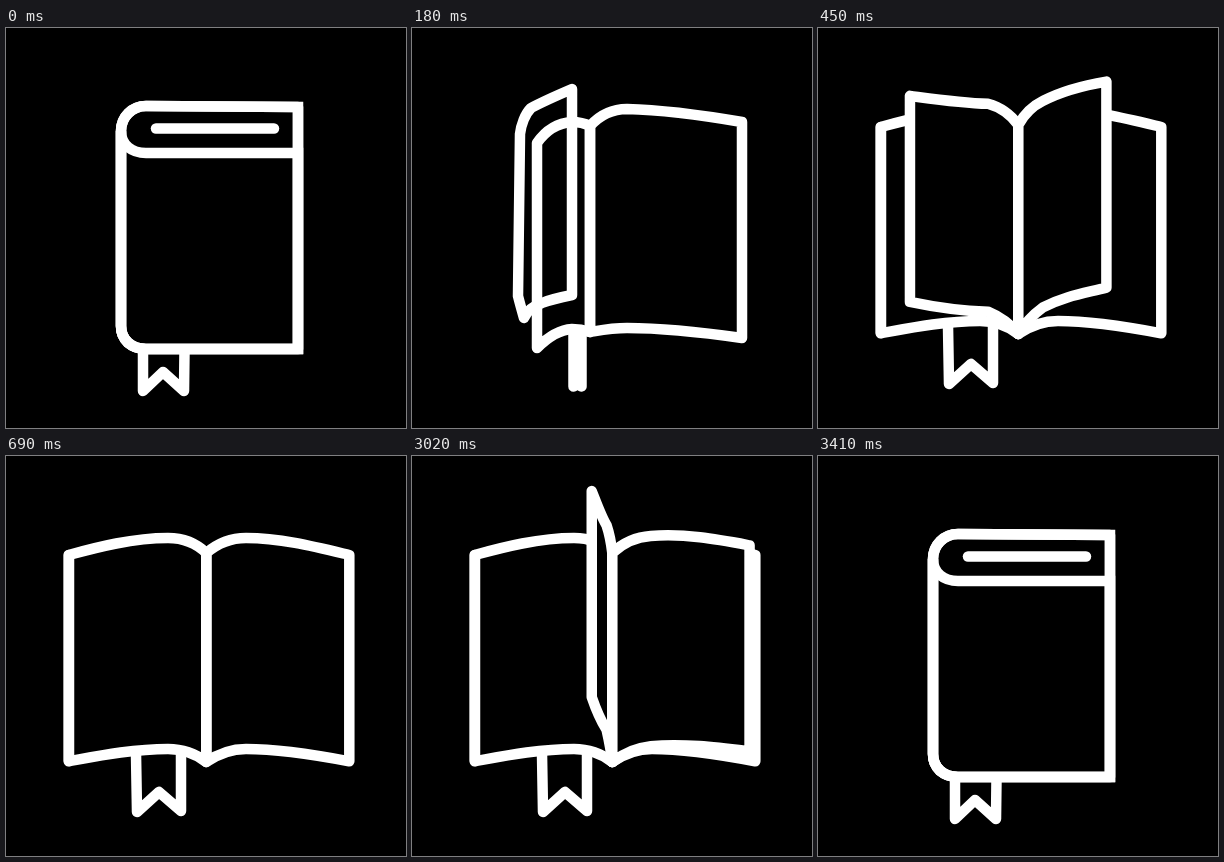
Animation, 400 px wide and 400 px high, one loop 6.44 s. Source, as an HTML page:

```html
<!DOCTYPE html>
<html lang="en">
<head>
<meta charset="utf-8">
<title>Book</title>
<style>
html, body { margin: 0; width: 100%; height: 100%; overflow: hidden; background: #000; }
svg { display: block; width: 100vw; height: 100vh; }
path { fill: none; stroke: #fff; stroke-width: 10.5; stroke-linecap: round; stroke-linejoin: round; }
.solid { fill: #000; }
</style>
</head>
<body>
<svg viewBox="0 0 400 400">
  <path id="ribbon"/>
  <path id="right" class="solid"/>
  <path id="left"/>
  <path id="cover"/>
  <path id="title"/>
  <path id="back" class="solid"/>
  <path id="front" class="solid"/>
</svg>
<script>
const LOOP = 6440, STEP = 30, OPEN = 690, CLOSE_START = 2750, CLOSE_END = 3410;
const UNFOLD = 273, HALFWAY = 0.74;
const FLIP = 360, FIRST_FLIP = 199, SECOND_FLIP = 320;

// Each part has three poses: closed, half unfolded, open.
const closedBook = 'M115,103 C115,89 126,78 140,78 C190,78 240,79 292,79 L292,321 C240,321 190,321 140,321 C126,321 115,312 115,298 Z';
const poses = {
  right: [
    closedBook,
    'M178,98 C188,87 200,81 215,81 C255,82 295,88 330,94 L330,310 C295,305 255,300 215,300 C200,300 190,302 178,304 Z',
    'M200.3,97 C212,87 225,82 240,82 C275,82 310,91 343.3,99 L343.3,305.3 C310,299 275,293 240,293 C225,293 212,298 200.3,306 Z'
  ],
  left: [
    closedBook,
    'M178,98 C172,95 167,94 160,94 C145,95 134,102 125,115 L125,320 C134,311 145,302 160,301 C167,301 172,302 178,304 Z',
    'M200.3,97 C190,87 177,82 162,82 C127,82 92,91 62.7,99 L62.7,305.3 C92,300 127,293 162,293 C177,293 190,298 200.3,306 Z'
  ],
  cover: [
    'M292,125 C240,125 190,125 140,125 C126,125 115,117 115,103 L115,298 C115,305 118,311 122,315 C127,319 133,321 140,321 C190,321 240,321 292,321 Z',
    'M160,61 C146,67 132,73 119,80 C113,86 109,97 108,106 L106,268 C108,276 110,283 112,290 C115,283 121,278 130,275 C140,271 150,269 160,267 Z',
    'M63,99 C63,99 63,99 63,99 C63,99 63,99 63,99 L63,305 C63,305 63,305 63,305 C63,305 63,305 63,305 C63,305 63,305 63,305 Z'
  ],
  ribbon: [
    'M137,323 L137,363 L157,344 L178,363 L178.5,323',
    'M161.5,304 L161.5,358.5 L165.5,356 L169.5,358.5 L169.5,304',
    'M130,298 L131,356 L153,336 L175,355 L175,298'
  ]
};

const el = id => document.getElementById(id);
const clamp = x => Math.min(1, Math.max(0, x));
const ease = x => (1 - Math.cos(Math.PI * clamp(x))) / 2;
const draw = (id, d) => el(id).setAttribute('d', d);

function mix(a, b, k) {
  const target = b.match(/[\d.]+/g);
  let i = 0;
  return a.replace(/[\d.]+/g, n => (+n + (target[i++] - n) * k).toFixed(2));
}

function morph([closed, half, open], e) {
  return e < HALFWAY
    ? mix(closed, half, e / HALFWAY)
    : mix(half, open, (e - HALFWAY) / (1 - HALFWAY));
}

// A leaf turning about the spine, from the right side to the left.
function leaf(time, start) {
  const p = (time - start) / FLIP;
  if (p <= 0 || p >= 1) return '';
  const angle = Math.PI * ease(p), c = Math.cos(angle);
  const lift = 65 * Math.sin(angle) ** 1.5;
  const reach = c > 0 ? 1 : 137 / 143;
  const at = (dx, y, k) => `${(200.3 + dx * c * reach).toFixed(2)},${(y - lift * k).toFixed(2)}`;
  const k1 = 0.35 + 0.16 * c, k2 = 0.7 + 0.08 * c;
  return `M200.3,97 C${at(12, 87, 0.08)} ${at(25, 82, 0.1)} ${at(40, 82, 0.2)}`
    + ` C${at(75, 82, k1)} ${at(110, 91, k2)} ${at(143, 99, 1)}`
    + ` L${at(143, 305, 1)} C${at(110, 299, k2)} ${at(75, 293, k1 + 0.1)} ${at(40, 293, 0.3)}`
    + ` C${at(25, 293, 0.15)} ${at(12, 298, 0.1)} 200.3,306 Z`;
}

// Closing plays the opening backwards.
function openingTime(t) {
  if (t < OPEN) return Math.floor(t / STEP) * STEP;
  if (t < CLOSE_START) return OPEN;
  return Math.max(0, Math.ceil((CLOSE_END - t) / STEP) * STEP);
}

function render(t) {
  const time = openingTime(t);
  const e = ease(time / UNFOLD);
  for (const id in poses) draw(id, morph(poses[id], e));

  const join = time ? 'round' : 'miter';
  el('right').style.strokeLinejoin = join;
  el('cover').style.strokeLinejoin = join;

  const titleLeft = 1 - e / 0.3;
  const shift = 85 * e;
  draw('title', titleLeft > 0 ? `M${150 + shift},100.5 H${150 + shift + 118 * titleLeft}` : '');

  const leaves = [leaf(time, FIRST_FLIP), leaf(time, SECOND_FLIP)];
  if (time < FIRST_FLIP + FLIP / 2) leaves.reverse();
  draw('back', leaves[0]);
  draw('front', leaves[1]);
}

const begin = performance.now();
function tick() {
  render((performance.now() - begin) % LOOP);
  requestAnimationFrame(tick);
}
tick();
</script>
</body>
</html>
```
